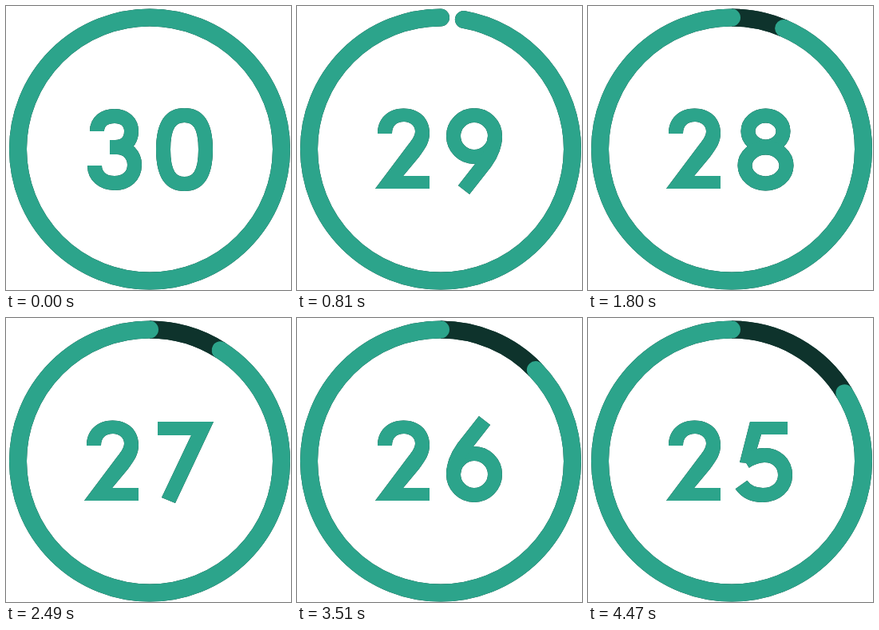
Animation of 357x356 px, one loop 4.5 s. Source, as an HTML page:

```html
<!DOCTYPE html>
<html lang="en">
<head>
<meta charset="utf-8">
<title>Countdown</title>
<style>
  html, body { margin: 0; width: 100%; height: 100%; overflow: hidden; background: #fff; }
  svg { display: block; width: 357px; height: 356px; filter: drop-shadow(0 0 .4px #0e332c); }
  .line { fill: none; stroke: #2ca48b; stroke-width: 18; }
  .solid { fill: #2ca48b; }
  .ring { fill: none; stroke-width: 22; }
</style>
</head>
<body>
<svg viewBox="0 0 357 356" role="img">
  <circle id="track" class="ring" r="165" pathLength="360" stroke="#0e332c"
    transform="translate(180 179.5) rotate(-90)"/>
  <circle id="arc" class="ring" r="165" pathLength="360" stroke="#2ca48b" stroke-linecap="round"
    transform="matrix(0 -1 -1 0 180 179.5)"/>

  <path id="tens3" class="line" d="M114 157C114 145 123 138 136 138C149 138 157 146 157 157
    C157 169 149 177 137 177H130H139C152 177 161 187 161 199C161 213 151 222 136 222
    C121 222 111 213 111 200"/>
  <path id="tens2" class="solid" d="M101 160C101 141 114 128.5 133.5 128.5C153 128.5 166 141 166 159
    C166 171 161 178 153 189L133 213H166V229H98L137 177C144 168 148 163 148 157
    C148 150 142 145 134 145C125 145 119 150 119 160Z"/>

  <path id="units0" class="line" d="M197 180C197 150 206 137 223.5 137S250 150 250 180
    S241 223 223.5 223S197 210 197 180Z"/>
  <g id="units9" class="line">
    <circle cx="222" cy="163" r="26"/>
    <path d="M248 163C248 175 244 185 236 196L209 230.5"/>
  </g>
  <g id="units8" class="line">
    <ellipse cx="222.5" cy="157" rx="22" ry="19.5"/>
    <ellipse cx="222.5" cy="200" rx="26" ry="22.5"/>
  </g>
  <path id="units7" class="solid" d="M190 130H260L212 232L195 225L232 147H190Z"/>
  <use id="units6" href="#units9" transform="rotate(180 222 179.5)"/>
  <g id="units5">
    <path class="solid" d="M203 130H250V146H217L211 166L202 182L190 181Z"/>
    <path class="line" d="M192 209C199 219 208 222 219 222C236 222 247 211 247 197
      C247 182 236 172 221 172C213 172 205 175 197 180"/>
  </g>
</svg>
<script>
const LOOP = 4500, STEP = 30, STEPS_PER_SECOND = 30, DEGREES_PER_SECOND = 12;
const $ = id => document.getElementById(id);
const svg = document.querySelector('svg');
const defs = svg.insertBefore(document.createElementNS(svg.namespaceURI, 'defs'), svg.firstChild);
const digits = svg.appendChild(document.createElementNS(svg.namespaceURI, 'g'));
svg.querySelectorAll('[id^=tens], [id^=units]').forEach(glyph => defs.append(glyph));

function showNumber(value) {
  const [tens, units] = String(value);
  svg.setAttribute('aria-label', value);
  digits.innerHTML = `<use href="#tens${tens}"/><use href="#units${units}"/>`;
}

let shown;
function draw(now) {
  const step = Math.floor(now % LOOP / STEP);
  const elapsed = Math.max(0, step - 1.8) / STEPS_PER_SECOND;
  const gap = elapsed * DEGREES_PER_SECOND;
  const value = Math.floor(30 - elapsed);
  $('arc').setAttribute('stroke-dasharray', gap ? `${360 - gap} 360` : 'none');
  $('track').setAttribute('stroke-dasharray', `${gap} 360`);
  // The track only shows once the gap is wide enough
  $('track').style.visibility = elapsed > 1 ? 'visible' : 'hidden';
  if (value !== shown) showNumber(shown = value);
}

const start = performance.now();
function tick() {
  draw(performance.now() - start);
  requestAnimationFrame(tick);
}
tick();
</script>
</body>
</html>
```
